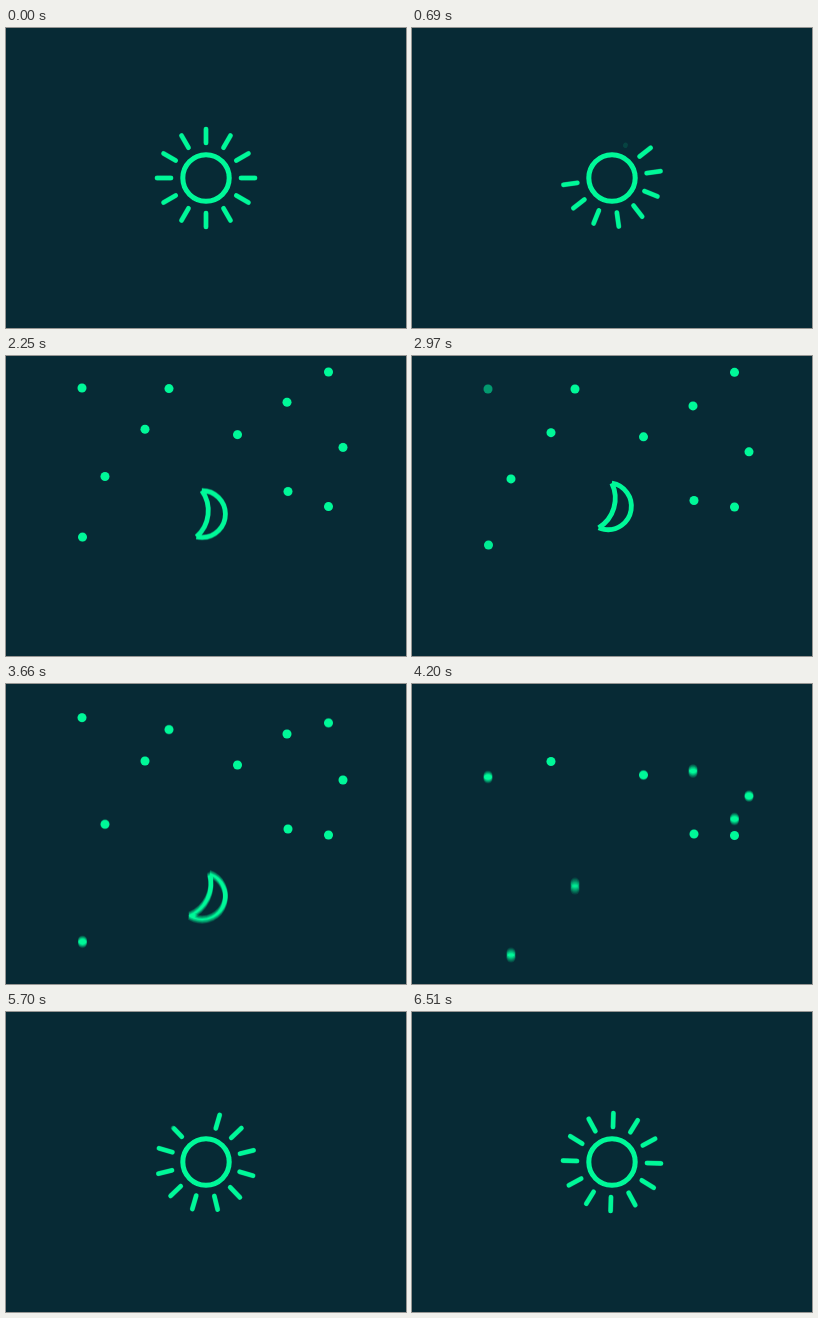
Write an HTML page with a canvas that moves like this. It is 400 px wide and 300 px high and loops after 6540 ms.

```html
<!DOCTYPE html>
<html lang="en">
<head>
<meta charset="utf-8">
<title>Day and night</title>
<style>
  html, body { margin: 0; width: 100%; height: 100%; overflow: hidden; background: #072a35; }
  canvas { display: block; width: 400px; height: 300px; }
</style>
</head>
<body>
<canvas id="sky" width="400" height="300"></canvas>
<script>
const ctx = document.getElementById('sky').getContext('2d');
const LOOP = 6540, FRAME = 30;
const SHUTTER = 15, SAMPLES = 8;
const TAU = Math.PI * 2, RAD = Math.PI / 180;
const GREEN = '#00fb9b';
const DEPTH = 180;
const ENTER = 1680, LEAVE = 4200;

// x, y at rest, height above rest at ENTER, settling time,
// start of the fall, distance fallen at LEAVE
const stars = [
  [76.5, 189, 85, 240, 2700, 410],
  [99, 123, 38, 210, 2900, 148],
  [139, 77, 27, 290, 4060, 0.5],
  [163, 33, 45, 120, 3070, 169],
  [76, 33, 60, 140, 3400, 60],
  [231.5, 81, 23, 250, 3850, 10],
  [281, 50, 65, 200, 3800, 37],
  [282, 145, 93, 250, 3840, 5],
  [322.5, 16, 34, 80, 2600, 119],
  [322.5, 151, 18, 153, 4100, 0.5],
  [337, 96, 69, 210, 3900, 16]
];

const clamp = v => Math.min(1, Math.max(0, v));
const span = (t, start, length) => clamp((t - start) / length);
const easeIn = u => u * u;
const easeOut = u => 1 - (1 - u) ** 3;
const easeBoth = u => (1 - Math.cos(Math.PI * u)) / 2;
const dip = (t, at, depth) => 1 - depth * Math.exp(-(((t - at) / 130) ** 2));

function rayLength(i, t) {
  return t < 3000
    ? 1 - span(t, 475 + 60 * i, 30)
    : easeOut(span(t, 5160 + 50 * i, 90));
}

function drawSun(t) {
  const drop = t < 3000
    ? easeIn(span(t, 1000, 600))
    : 1 - easeOut(span(t, 4300, 1170));
  if (drop >= 1) return;

  ctx.save();
  ctx.translate(200, 150 + DEPTH * drop);
  ctx.lineWidth = 5;
  ctx.beginPath();
  ctx.arc(0, 0, 23.2, 0, TAU);
  ctx.stroke();

  ctx.rotate(-TAU * t / LOOP);
  ctx.lineWidth = 4.7;
  ctx.lineCap = 'round';
  for (let i = 0; i < 12; i++) {
    const length = rayLength(i, t);
    if (length <= 0) continue;
    const angle = (240 + 30 * i) * RAD;
    const c = Math.cos(angle), s = Math.sin(angle);
    const outer = 35 + 14 * length;
    ctx.beginPath();
    ctx.moveTo(35 * c, 35 * s);
    ctx.lineTo(outer * c, outer * s);
    ctx.stroke();
  }
  ctx.restore();
}

function drawMoon(t) {
  const drop = 1 - easeBoth(span(t, 1318, 1075)) + easeIn(span(t, 3250, 700));
  if (drop >= 1) return;

  ctx.save();
  ctx.translate(196, 150.3 + DEPTH * drop);
  ctx.rotate((-1 + (t - ENTER) * 0.0135) * RAD);
  ctx.lineWidth = 4.8;
  ctx.beginPath();
  ctx.arc(0, 0, 23.4, -97 * RAD, 97 * RAD);
  ctx.arc(-28.5, 0, 34.6, 42.2 * RAD, -42.2 * RAD, true);
  ctx.closePath();
  ctx.stroke();
  ctx.restore();
}

function drawStars(t, alpha) {
  if (t < 1320 || t > 5000) return;
  stars.forEach(([x, y, above, settle, start, fallen], i) => {
    const rise = above * Math.exp((ENTER - t) / settle);
    const fall = fallen * (Math.max(0, t - start) / (LEAVE - start)) ** 4;
    const glow = i === 0 ? dip(t, 3150, 0.45) : i === 4 ? dip(t, 2970, 0.45) : 1;
    ctx.globalAlpha = alpha * glow;
    ctx.beginPath();
    ctx.arc(x, y - rise + fall, 4.5, 0, TAU);
    ctx.fill();
  });
}

function draw(time) {
  const alpha = 1 / SAMPLES;
  ctx.clearRect(0, 0, 400, 300);
  ctx.globalCompositeOperation = 'lighter';
  ctx.strokeStyle = ctx.fillStyle = GREEN;
  // Summed samples across the shutter give the motion blur.
  for (let k = 0; k < SAMPLES; k++) {
    const t = time + SHUTTER * ((k + 0.5) / SAMPLES - 0.5);
    ctx.globalAlpha = alpha;
    drawSun(t);
    drawMoon(t);
    drawStars(t, alpha);
  }
}

const begin = performance.now();
function tick() {
  const t = (performance.now() - begin) % LOOP;
  draw(Math.floor(t / FRAME) * FRAME);
  requestAnimationFrame(tick);
}
tick();
</script>
</body>
</html>
```
